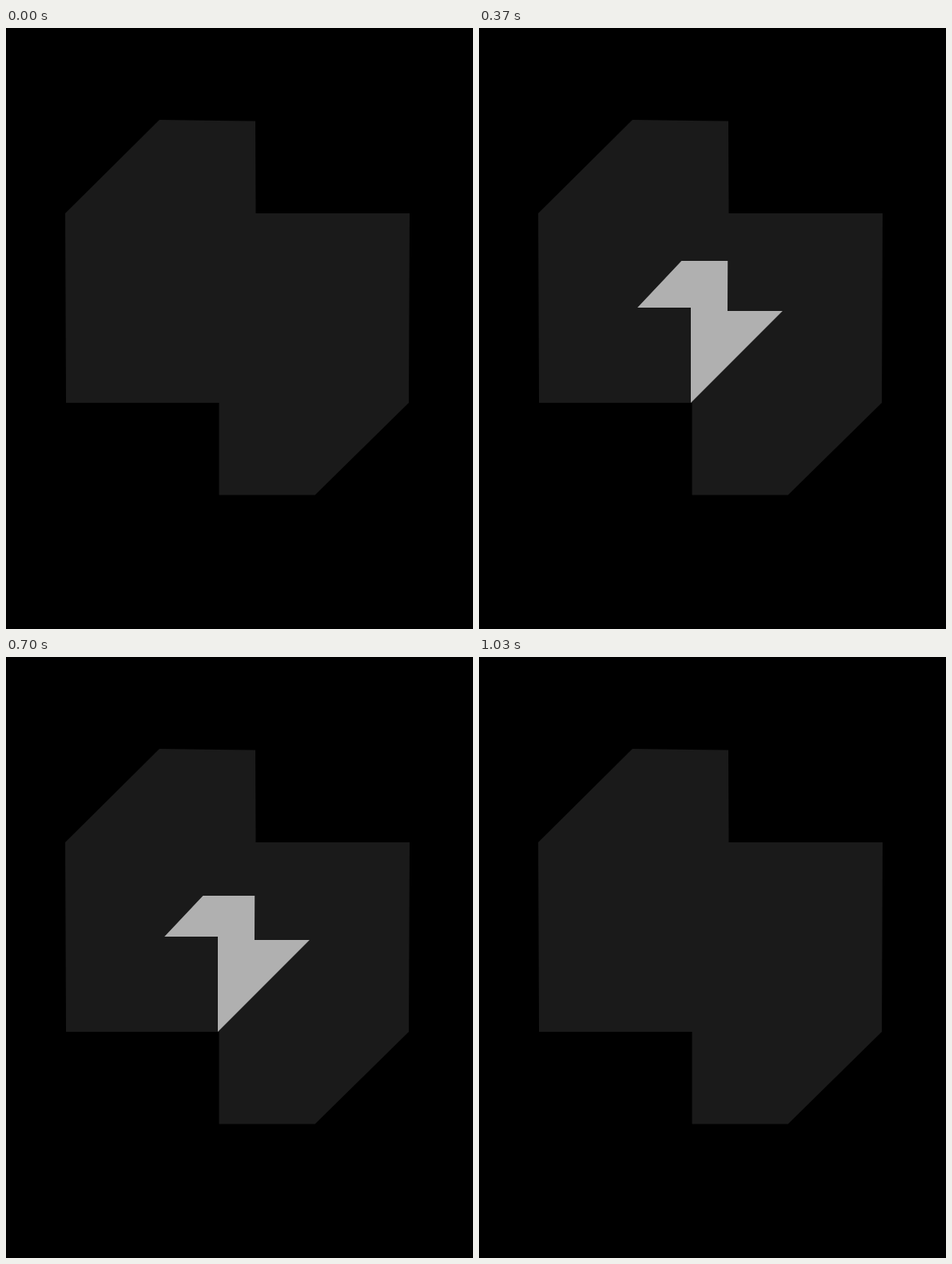
An HTML page that plays this animation: 560 by 720 pixels, repeating every 1060 ms.

```html
<!DOCTYPE html>
<html lang="en">
<head>
<meta charset="utf-8">
<title>Bolt loader</title>
<style>
  html, body { margin: 0; width: 100%; height: 100%; overflow: hidden; background: #000; }
  svg { display: block; width: 560px; height: 720px; }
</style>
</head>
<body>
<svg viewBox="0 0 560 720">
  <clipPath id="wipe"><rect id="window" x="0" y="449" width="560" height="0"/></clipPath>
  <polygon fill="#1a1a1a" points="184,110 299,111.5 299.5,222 484,222 483,449 370.5,559.5 255.5,559.5 255.5,449 72,449 71,222"/>
  <polygon fill="#b0b0b0" clip-path="url(#wipe)" points="298.5,220 298,339 364,339 254,449 254,335 190,335"/>
</svg>
<script>
const LOOP = 1060;
const TOP = 220, BOTTOM = 449;
const SPEED = 21.6; // pixels per step, 30 steps a second
const HIDE_STEP = 17;
const view = document.getElementById('window');

const clamp = y => Math.min(BOTTOM, Math.max(TOP, Math.round(y)));

// Upper edge of the visible part: rises to reveal, then falls to hide.
function edge(step) {
  return step < HIDE_STEP
    ? clamp(430 - SPEED * (step - 4))
    : clamp(243 + SPEED * (step - 19));
}

function draw(now) {
  const time = Math.floor((now % LOOP) / 10) * 10;
  const step = Math.floor((time + 4) * 0.03);
  const y = edge(step);
  view.setAttribute('y', y);
  view.setAttribute('height', BOTTOM - y);
}

function tick() {
  draw(performance.now());
  requestAnimationFrame(tick);
}
tick();
</script>
</body>
</html>
```
